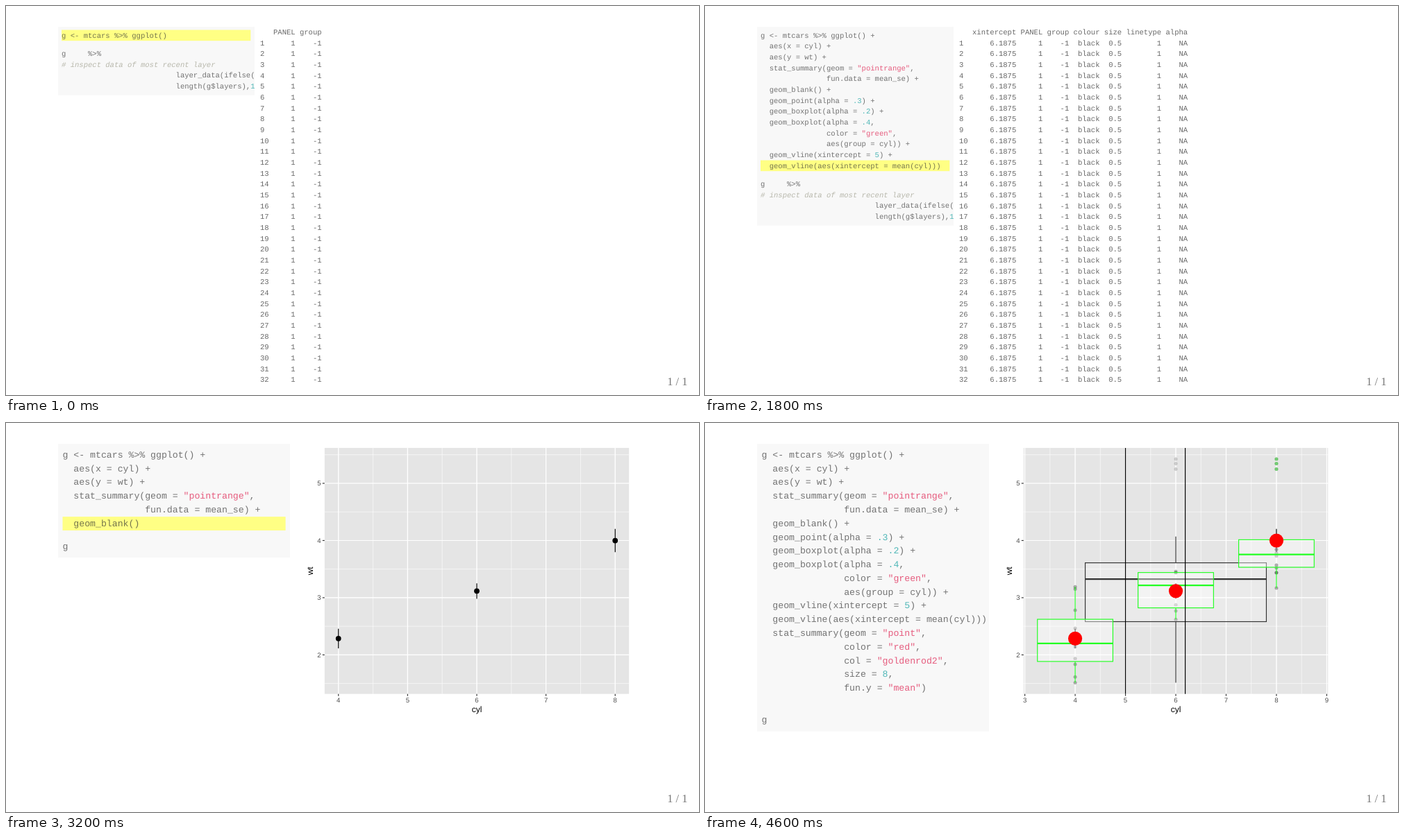
An HTML page for the animation above (4800 ms loop, 998 by 561 pixels).

```html
<!DOCTYPE html>
<html lang="en">
<head>
<meta charset="utf-8">
<title>Building a ggplot layer by layer</title>
<style>
  html, body { margin: 0; width: 100%; height: 100%; overflow: hidden; background: #fff; }
  svg { display: block; }
  text { white-space: pre; text-rendering: geometricPrecision; }
  .mono { font-family: "Liberation Mono", "Courier New", monospace; fill: #333; }
  .code { fill-opacity: 0.68; }
  .table { fill-opacity: 0.74; font-size: 10.556px; }
  .str { fill: #d14; }
  .num { fill: #099; }
  .com { fill: #998; font-style: italic; }
  .tick, .title { font-family: "Liberation Sans", Arial, sans-serif; text-anchor: middle; }
  .tick { font-size: 9.6px; fill: #4d4d4d; }
  .title { font-size: 12px; fill: #000; }
  .page { font: 16.5px "Liberation Serif", Times, serif; fill: #777; text-anchor: end; }
</style>
</head>
<body>
<svg id="stage" width="998" height="561" viewBox="0 0 998 561">
  <text class="page" x="981.5" y="546.7">1 / 1</text>
</svg>
<script>
const STEP = 200;
const stage = document.getElementById("stage");

function el(parent, tag, attrs, text) {
  const node = document.createElementNS("http://www.w3.org/2000/svg", tag);
  for (const key in attrs) node.setAttribute(key, attrs[key]);
  if (text !== undefined) node.textContent = text;
  parent.appendChild(node);
  return node;
}

// ---- Data ----
const wt = [2.62, 2.875, 2.32, 3.215, 3.44, 3.46, 3.57, 3.19, 3.15, 3.44, 3.44,
  4.07, 3.73, 3.78, 5.25, 5.424, 5.345, 2.2, 1.615, 1.835, 2.465, 3.52, 3.435,
  3.84, 3.845, 1.935, 2.14, 1.513, 3.17, 2.77, 3.57, 2.78];
const cyl = [..."66468684466888888444488884448684"].map(Number);
const groups = [4, 6, 8];
const means = [2.285727, 3.117143, 3.999214];
const lows = [2.113997, 2.982457, 3.796255];
const highs = [2.457457, 3.251829, 4.202174];
const outliers = [5.25, 5.424, 5.345];
const words = s => s.split(" ");

// ---- Code panel ----
const chunks = [
  ["g <- mtcars %>% ggplot()"],
  ["  aes(x = cyl)"],
  ["  aes(y = wt)"],
  ['  stat_summary(geom = "pointrange",', "               fun.data = mean_se)"],
  ["  geom_blank()"],
  ["  geom_point(alpha = .3)"],
  ["  geom_boxplot(alpha = .2)"],
  ["  geom_boxplot(alpha = .4,", '               color = "green",', "               aes(group = cyl))"],
  ["  geom_vline(xintercept = 5)"],
  ["  geom_vline(aes(xintercept = mean(cyl)))"],
  ['  stat_summary(geom = "point",', '               color = "red",',
   '               col = "goldenrod2",', "               size = 8,", '               fun.y = "mean")']
];
const indent = " ".repeat(26);
const inspectTail = ["g     %>%", "# inspect data of most recent layer",
  indent + "layer_data(ifelse(", indent + "length(g$layers),1,"];

const inspectStyle = { x: 80, pad: 4.5, foot: 5.3, size: 10.556, line: 15.665, base: 11.2, right: 358, mark: 352.3, tail: inspectTail };
const plotStyle = { x: 81.5, pad: 6.3, foot: 6.3, size: 13.2, line: 19.77, base: 13.65, right: 409, mark: 402.6, tail: ["g"] };

function codeLine(parent, x, y, size, line) {
  const text = el(parent, "text", { class: "mono code", x, y, "font-size": size });
  for (const part of line.split(/("[^"]*"|#.*|\.?\b\d+)/)) {
    if (!part) continue;
    const cls = part[0] === '"' ? "str" : part[0] === "#" ? "com" : /^\.?\d+$/.test(part) ? "num" : "";
    el(text, "tspan", { class: cls }, part);
  }
}

function drawCode(parent, k, s) {
  const done = k >= chunks.length;
  const shown = chunks.slice(0, k + 1);
  const lines = shown.flatMap((chunk, i) => chunk.map((line, j) =>
    i < shown.length - 1 && j === chunk.length - 1 ? line + " +" : line));
  const top = 30 + s.pad;
  const tailTop = top + lines.length * s.line + (done ? 2 : 1) * s.size;
  const bottom = tailTop + s.tail.length * s.line + s.foot;
  const box = el(parent, "svg", { x: 0, y: 0, width: s.right, height: 561 });
  el(box, "rect", { x: 75, y: 30, width: s.right - 75, height: bottom - 30, fill: "#f8f8f8" });
  if (!done) {
    const n = chunks[k].length;
    el(box, "rect", { x: s.x, y: top + (lines.length - n) * s.line,
      width: s.mark - s.x, height: n * s.line, fill: "#ffff84" });
  }
  const put = (list, y) => list.forEach((line, i) =>
    codeLine(box, s.x, y + i * s.line + s.base, s.size, line));
  put(lines, top);
  put(s.tail, tailTop);
}

// ---- Printed data frames, wrapped at 80 columns ----
function printFrame(n, cols) {
  const index = Array.from({ length: n + 1 }, (_, i) => (i ? String(i) : "").padEnd(String(n).length));
  const out = [];
  let block = index.slice();
  for (const name in cols) {
    const value = cols[name];
    const cells = [name, ...Array.from({ length: n }, (_, i) => String(Array.isArray(value) ? value[i] : value))];
    const width = Math.max(...cells.map(c => c.length)) + 1;
    if (block[0].length + width > 80) {
      out.push(...block);
      block = index.slice();
    }
    block = block.map((row, i) => row + cells[i].padStart(width));
  }
  return out.concat(block);
}

const panel = { PANEL: 1, group: -1 };
const xy = { x: cyl, y: wt.map(v => v.toFixed(3)), ...panel };
const lineLook = { colour: "black", size: "0.5", linetype: 1, alpha: "NA" };
const boxLook = (colour, alpha) => ({ weight: 1, colour, fill: "white", size: "0.5", alpha, shape: 19, linetype: "solid" });
const outlierText = "5.250, 5.424, 5.345";
const redMeans = [3, { x: groups, group: -1, y: means, ymin: "NA", ymax: "NA", PANEL: 1,
  flipped_aes: "FALSE", shape: 19, colour: "red", size: 8, fill: "NA", alpha: "NA", stroke: "0.5" }];

const frames = [
  [32, panel],
  [32, { x: cyl, ...panel }],
  [32, xy],
  [3, { x: groups, group: -1, y: means, ymin: lows, ymax: highs, PANEL: 1, flipped_aes: "FALSE",
    colour: "black", size: "0.5", linetype: 1, shape: 19, fill: "NA", alpha: "NA", stroke: 1 }],
  [32, xy],
  [32, { ...xy, shape: 19, colour: "black", size: "1.5", fill: "NA", alpha: "0.3", stroke: "0.5" }],
  [1, { ymin: "1.513", lower: "2.58125", middle: "3.325", upper: "3.61", ymax: "4.07",
    outliers: outlierText, notchupper: "3.612338", notchlower: "3.037662", x: 6,
    flipped_aes: "FALSE", group: -1, PANEL: 1, ymin_final: "1.513", ymax_final: "5.424",
    xmin: "4.2", xmax: "7.8", xid: 1, newx: 6, new_width: "3.6", ...boxLook("grey20", "0.2") }],
  [3, { ymin: words("1.513 2.620 3.170"), lower: words("1.8850 2.8225 3.5325"),
    middle: words("2.200 3.215 3.755"), upper: words("2.62250 3.44000 4.01375"),
    ymax: words("3.19 3.46 4.07"), outliers: ["", "", outlierText],
    notchupper: words("2.551336 3.583761 3.958219"), notchlower: words("1.848664 2.846239 3.551781"),
    x: groups, flipped_aes: "FALSE", group: [1, 2, 3], PANEL: 1,
    ymin_final: words("1.513 2.620 3.170"), ymax_final: words("3.190 3.460 5.424"),
    xmin: words("3.25 5.25 7.25"), xmax: words("4.75 6.75 8.75"), xid: [1, 2, 3], newx: groups,
    new_width: "1.5", ...boxLook("green", "0.4") }],
  [1, { xintercept: 5, ...panel, ...lineLook }],
  [32, { xintercept: 6.1875, ...panel, ...lineLook }],
  redMeans,
  redMeans
];

function drawTable(parent, k) {
  printFrame(...frames[k]).forEach((row, i) =>
    el(parent, "text", { class: "mono table", x: 366, y: 41 + i * 15.665 }, row));
}

// ---- Plot ----
const LWD = 1.16;

function drawPlot(parent, k) {
  const left = k < 2 ? 433.5 : k === 3 ? 466.8 : 458.8;
  const right = 897.2, top = 35.9, bottom = k ? 390.7 : 419.7;
  const expand = (a, b) => [a - (b - a) * 0.05, b + (b - a) * 0.05];
  const [x0, x1] = k < 7 ? expand(4, 8) : expand(3.25, 8.75);
  const [y0, y1] = k === 3 ? expand(lows[0], highs[2]) : expand(1.513, 5.424);
  const X = v => left + (v - x0) / (x1 - x0) * (right - left);
  const Y = v => bottom - (v - y0) / (y1 - y0) * (bottom - top);

  const line = (xa, ya, xb, yb, stroke, width = LWD) =>
    el(parent, "line", { x1: xa, y1: ya, x2: xb, y2: yb, stroke, "stroke-width": width });
  const dot = (x, y, r, fill, opacity = 1) =>
    el(parent, "circle", { cx: X(x), cy: Y(y), r, fill, "fill-opacity": opacity });
  const vline = x => line(X(x), top, X(x), bottom, "#000");
  const inside = (a, b, step) => {
    const list = [];
    for (let i = Math.ceil(a / step); i * step <= b; i++) list.push(i * step);
    return list;
  };

  function boxplot(x, half, [ymin, lower, middle, upper, ymax], colour, alpha, out) {
    out.forEach(v => dot(x, v, 2.5, colour, alpha));
    line(X(x), Y(upper), X(x), Y(ymax), colour);
    line(X(x), Y(lower), X(x), Y(ymin), colour);
    el(parent, "rect", { x: X(x - half), y: Y(upper), width: X(x + half) - X(x - half),
      height: Y(lower) - Y(upper), fill: "#fff", "fill-opacity": alpha, stroke: colour, "stroke-width": LWD });
    line(X(x - half), Y(middle), X(x + half), Y(middle), colour, LWD * 2);
  }

  el(parent, "rect", { x: left, y: top, width: right - left, height: bottom - top, fill: "#e5e5e5" });

  const yStep = k === 3 ? 0.5 : 1;
  const xMajor = k > 0 ? inside(x0, x1, 1) : [];
  const yMajor = k > 1 ? inside(y0, y1, yStep) : [];
  if (k > 1) inside(y0, y1, yStep / 2).forEach(v => line(left, Y(v), right, Y(v), "#fff", LWD / 2));
  if (k > 0) inside(x0, x1, 0.5).forEach(v => line(X(v), top, X(v), bottom, "#fff", LWD / 2));
  yMajor.forEach(v => line(left, Y(v), right, Y(v), "#fff"));
  xMajor.forEach(v => line(X(v), top, X(v), bottom, "#fff"));

  if (k >= 3) groups.forEach((g, i) => {
    line(X(g), Y(lows[i]), X(g), Y(highs[i]), "#000");
    dot(g, means[i], 3.9, "#000");
  });
  if (k >= 5) wt.forEach((v, i) => dot(cyl[i], v, 2.5, "#000", 0.3));
  if (k >= 6) boxplot(6, 1.8, [1.513, 2.58125, 3.325, 3.61, 4.07], "#333", 0.2, outliers);
  if (k >= 7) {
    const green = "#2f2";
    boxplot(4, 0.75, [1.513, 1.885, 2.2, 2.6225, 3.19], green, 0.4, []);
    boxplot(6, 0.75, [2.62, 2.8225, 3.215, 3.44, 3.46], green, 0.4, []);
    boxplot(8, 0.75, [3.17, 3.5325, 3.755, 4.01375, 4.07], green, 0.4, outliers);
  }
  if (k >= 8) vline(5);
  if (k >= 9) vline(6.1875);
  if (k >= 10) groups.forEach((g, i) => dot(g, means[i], 10.1, "#f00"));

  xMajor.forEach(v => {
    line(X(v), bottom, X(v), bottom + 3, "#333");
    el(parent, "text", { class: "tick", x: X(v), y: bottom + 12.5 }, v);
  });
  yMajor.forEach(v => {
    line(left - 3, Y(v), left, Y(v), "#333");
    el(parent, "text", { class: "tick", x: left - 5.3, y: Y(v) + 3.4, style: "text-anchor:end" },
      k === 3 ? v.toFixed(1) : v);
  });
  if (k > 0) el(parent, "text", { class: "title", x: (left + right) / 2, y: 416.8 }, "cyl");
  if (k > 1) el(parent, "text", { class: "title", transform: "translate(442.4 213.3) rotate(-90)" }, "wt");
}

// ---- Scenes and playback ----
const scenes = Array.from({ length: 24 }, (_, i) => {
  const scene = el(stage, "g", { display: "none" });
  const k = i % 12;
  drawCode(scene, k, i < 12 ? inspectStyle : plotStyle);
  (i < 12 ? drawTable : drawPlot)(scene, k);
  return scene;
});

const start = performance.now();
let current = -1;

function show(now) {
  const i = Math.floor(Math.max(0, now - start) / STEP) % scenes.length;
  if (i !== current) {
    if (current >= 0) scenes[current].setAttribute("display", "none");
    scenes[i].removeAttribute("display");
    current = i;
  }
}
function tick() {
  show(performance.now());
  requestAnimationFrame(tick);
}
tick();
</script>
</body>
</html>
```
